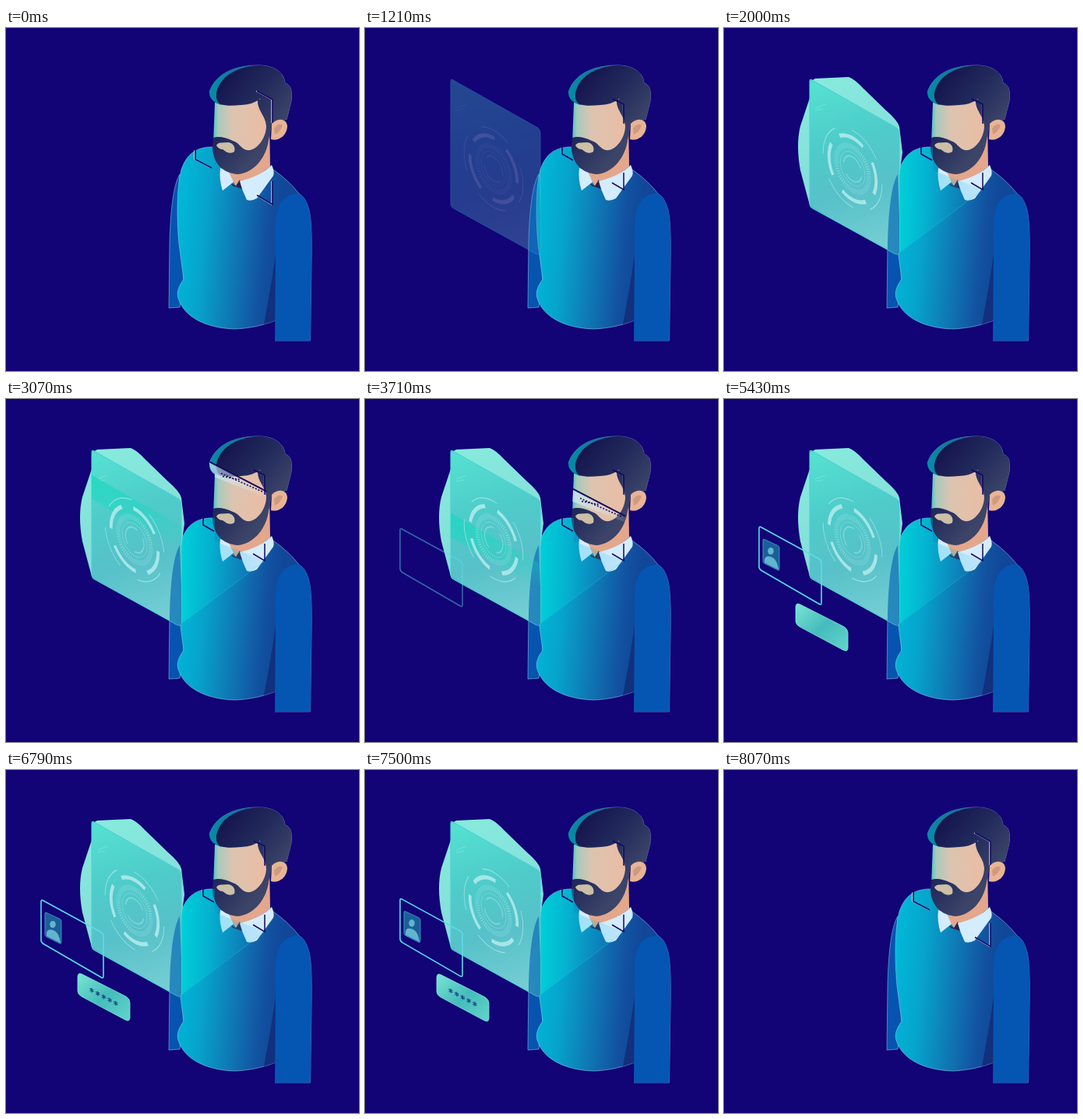
An HTML page that plays this animation: 453x441 px, repeating every 8140 ms.

```html
<!DOCTYPE html>
<html lang="en">
<head>
<meta charset="utf-8">
<title>Face scan</title>
<style>
html, body { margin: 0; width: 100%; height: 100%; overflow: hidden; background: #120476; }
svg { display: block; width: 453px; height: 441px; }
</style>
</head>
<body>
<svg viewBox="0 0 453 441" fill="none">
  <defs>
    <linearGradient id="sweater" gradientUnits="userSpaceOnUse" x1="220" y1="270" x2="352" y2="282">
      <stop stop-color="#00b6d6"/><stop offset=".25" stop-color="#06a4cc"/>
      <stop offset=".6" stop-color="#0f74b2"/><stop offset=".85" stop-color="#1251a0"/><stop offset="1" stop-color="#114698"/>
    </linearGradient>
    <linearGradient id="skin" gradientUnits="userSpaceOnUse" x1="267" y1="0" x2="335" y2="0">
      <stop stop-color="#5cc6c4"/><stop offset=".08" stop-color="#a9cabc"/>
      <stop offset=".35" stop-color="#dcc4b0"/><stop offset="1" stop-color="#ebbca4"/>
    </linearGradient>
    <linearGradient id="hair" gradientUnits="userSpaceOnUse" x1="285" y1="62" x2="355" y2="120">
      <stop stop-color="#16164f"/><stop offset=".5" stop-color="#222b5c"/><stop offset="1" stop-color="#3c4468"/>
    </linearGradient>
    <linearGradient id="fringe" x1="0" x2="1">
      <stop stop-color="#078ba5"/><stop offset="1" stop-color="#0d6d95"/>
    </linearGradient>
    <linearGradient id="panel" gradientUnits="userSpaceOnUse" x1="130" y1="70" x2="190" y2="285">
      <stop stop-color="#4fdfcf"/><stop offset=".35" stop-color="#48c9c8"/>
      <stop offset=".65" stop-color="#52bec7"/><stop offset="1" stop-color="#74cdd3"/>
    </linearGradient>
    <linearGradient id="glow" x1="0" y1="0" x2=".3" y2="1">
      <stop stop-color="#86ecdc"/><stop offset="1" stop-color="#84d6da"/>
    </linearGradient>
    <linearGradient id="beam" gradientUnits="userSpaceOnUse" x1="225" y1="0" x2="335" y2="0">
      <stop stop-color="#00e0d8" stop-opacity=".6"/><stop offset=".45" stop-color="#00c4d8" stop-opacity=".25"/>
      <stop offset="1" stop-color="#00a0d8" stop-opacity=".08"/>
    </linearGradient>
    <linearGradient id="button" x1="0" y1="0" x2="1" y2="1">
      <stop stop-color="#7be5d3"/><stop offset=".5" stop-color="#45bcbc"/><stop offset="1" stop-color="#62d5ca"/>
    </linearGradient>
    <linearGradient id="band" x1="0" y1="0" x2="0" y2="1">
      <stop stop-color="#18d8c0" stop-opacity=".75"/><stop offset="1" stop-color="#18d8c0" stop-opacity="0"/>
    </linearGradient>
    <linearGradient id="mist" x1="0" x2="1">
      <stop stop-color="#d8f0ff" stop-opacity=".75"/><stop offset="1" stop-color="#d8f0ff" stop-opacity=".1"/>
    </linearGradient>
    <path id="torso" d="M268 153C244 152 232 162 225 182C219 204 219 245 222 277L228 323C221 333 218 341 222 350C229 370 254 386 294 387C316 386 333 381 346 376L348 245L376 213Q364 197 343 182Z"/>
    <path id="farArm" d="M223 188C214 203 211 240 210 275L209 360L223 359L228 323Z"/>
    <path id="headShape" d="M261 83C267 62 289 48 324 48C344 48 357 57 358 71C367 73 367 84 366 94L360 121L336 155Q322 187 297 188Q268 180 265 155L268 97Q261 93 261 83Z"/>
    <path id="panelShape" d="M113 67L221 128Q225 131 225 136V287Q225 293 219 290L114 232Q110 230 110 225V69Q110 65 113 67Z"/>
    <clipPath id="torsoClip"><use href="#torso"/></clipPath>
    <clipPath id="headClip"><use href="#headShape"/></clipPath>
    <clipPath id="panelClip"><use href="#panelShape"/></clipPath>
  </defs>

  <!-- man -->
  <g stroke="#9fd0f0" stroke-opacity=".65" stroke-width=".8">
    <use href="#farArm" fill="#0654b0"/>
    <use href="#torso" fill="url(#sweater)"/>
    <path d="M345 402H390.500L392 300Q393 244 388 231Q384 217 376 213"/>
    <path d="M261 83C267 62 289 48 324 48C344 48 357 57 358 71C367 73 367 84 366 94L360 118"/>
  </g>
  <path fill="#12307b" d="M347 285Q339 340 331 381L346 376Z"/>
  <path fill="#0556b3" d="M345 402H390.500L392 300Q393 244 388 231Q384 217 376 213C360 212 350 223 347 240Q345 255 346 290Z"/>
  <path fill="#e3a78c" d="M338 120L339 178Q318 196 296 205L284 184Z"/>
  <path fill="#29224f" d="M288 199L295 203L300 195L303 207L291 203Z"/>
  <path id="collar" fill="#d4ecff" d="M275 180L285 183L292 198L278 209Q273 194 275 180ZM300 197Q328 190 341 176Q345 185 343 190L322 219Q315 223 309 221Q303 209 300 197Z"/>
  <path fill="url(#hair)" d="M270 90C273 67 294 49 324 48C344 48 357 57 358 71C367 73 367 84 366 94L360 118L337 128L325 90Z"/>
  <path fill="url(#skin)" d="M268 96L326 91L337 122V142Q327 174 298 179L266 150Z"/>
  <path fill="#e8b496" d="M341 123C350 114 361 117 361 127C360 139 349 146 340 143Z"/>
  <path fill="#d09a80" d="M344 129Q350 121 355 125Q352 134 345 137Z"/>
  <path fill="url(#hair)" d="M323 92C322 106 333 112 334 126C334 142 321 159 309 157C301 155 300 148 291 145Q276 138 266 141L265 154C266 174 278 187 298 188C318 186 334 167 337 144L341 125L341 92Z"/>
  <path fill="#cdbfa6" d="M270 151C272 146 279 148 284 147C291 147 295 153 293 159C287 163 282 159 278 156Q273 156 270 151Z"/>
  <path fill="url(#fringe)" d="M261 83C267 62 289 48 324 48L304 56L276 99Q261 94 261 83Z"/>
  <path fill="url(#hair)" d="M270 84C274 64 293 50 324 48L350 70L326 91Q318 98 302 99Q284 101 275 98Q269 94 270 84Z"/>

  <!-- projection on the man -->
  <g id="cast" clip-path="url(#torsoClip)">
    <path fill="url(#beam)" d="M225 131L268 153V183L332 208L222 291Z"/>
    <path stroke="#22cfe0" stroke-opacity=".35" d="M332 208L222 291"/>
  </g>
  <g clip-path="url(#headClip)"><g id="faceScan">
    <path fill="url(#mist)" d="M253 55L334 97V105L253 73Z"/>
    <path stroke="#140a5c" stroke-width="2" d="M253 55L334 97"/>
    <path stroke="#140a5c" stroke-width="1.600" stroke-dasharray="2 2" d="M276 74L330 98M278 78L300 82"/>
  </g></g>
  <g id="marks">
    <path stroke="#d5e4f5" stroke-width=".9" d="M264 165L283 173L312 158M273 151L298 154M283 140V148"/>
    <path stroke="#160b68" stroke-width="3.500" stroke-dasharray="4 6" d="M276 135H290M273 149H301M280 158H295"/>
  </g>
  <path id="paleLine" stroke="#eaf5ff" stroke-width="1.200" transform="translate(-1 0)"/>
  <path id="darkLine" stroke="#120462" stroke-width="1.500"/>

  <!-- scanner panel -->
  <path id="halo" fill="url(#glow)" d="M110 69L117 65L160 63Q168 66 178 77L208 106Q223 119 225 127L229 160L225 190L219 290L140 246L110 228L98 183Q92 150 98 126L110 90Z"/>
  <g id="screen">
    <use href="#panelShape" fill="url(#panel)" fill-opacity=".9" stroke="#4fd0d8" stroke-width="1.100"/>
    <path stroke="#8feee6" stroke-opacity=".5" d="M117 103L130 98M117 106L127 104"/>
    <g clip-path="url(#panelClip)">
      <use href="#farArm" fill="#1a7dba" fill-opacity=".85"/>
      <path id="panelScan" fill="url(#band)" d="M110 65L225 131V162L110 96Z"/>
    </g>
    <g transform="translate(165 181) matrix(.84 .47 0 1.1 0 0)" stroke="#c0f0f0">
      <g id="dial"></g>
      <g stroke-opacity=".4">
        <circle r="25" stroke-width="6" stroke-dasharray="1 1.618"/>
        <circle r="19" stroke-width=".7"/>
        <g id="core"><path stroke-width="1.500" d="M-14 0A14 14 0 0 1 12 -7M14 2A14 14 0 0 1 -9 10.700"/></g>
      </g>
    </g>
  </g>

  <!-- identity card and password field -->
  <g id="card">
    <path stroke="#5adce8" stroke-width="1.600" stroke-linejoin="round" d="M47 167L122 208Q125 210 125 213V264Q125 268 122 266L48 223Q45 221 45 218V169Q45 166 47 167Z"/>
    <g id="avatar">
      <path fill="#1c5e98" stroke="#4aa5c8" stroke-width=".8" d="M52 183L69 191Q71 192 71 194V221Q71 224 68 222L52 214Q50 213 50 211V184Q50 182 52 183Z"/>
      <ellipse cx="60" cy="198" rx="3.800" ry="4.600" fill="#62b5cf"/>
      <path fill="#62b5cf" d="M52 213Q51 203 59 205Q68 207 70 222Z"/>
    </g>
  </g>
  <g id="field">
    <path fill="url(#button)" stroke="#82e6d8" stroke-width=".8" d="M97 263L154 292Q159 295 159 300V319Q159 325 153 322L97 292Q92 289 92 285V267Q92 261 97 263Z"/>
    <g id="stars"></g>
  </g>
</svg>
<script>
const LOOP = 8140;
const $ = id => document.getElementById(id);
const ramp = (t, a, b) => {
  const k = Math.min(1, Math.max(0, (t - a) / (b - a)));
  return k * k * (3 - 2 * k);
};
const fade = (id, v) => $(id).setAttribute('opacity', v);
const move = (id, y) => $(id).setAttribute('transform', `translate(0 ${y})`);

function arc(r, mid, span) {
  const at = d => [Math.cos(d * Math.PI / 180) * r, Math.sin(d * Math.PI / 180) * r].map(n => n.toFixed(2));
  return `M${at(mid - span / 2)}A${r} ${r} 0 0 1 ${at(mid + span / 2)}`;
}
let dial = '';
for (let a = 0; a < 360; a += 90) {
  dial += `<path d="${arc(36, a, 60)}" stroke-width="4.500" stroke-opacity=".75"/>`;
  dial += `<path d="${arc(45, a + 30, 55)}" stroke-width="1" stroke-opacity=".65"/>`;
}
$('dial').innerHTML = dial;

let stars = '';
for (let i = 0; i < 5; i++) {
  stars += `<path transform="translate(${110 + i * 7.7} ${284 + i * 4.2})" stroke="#174f86" stroke-width="1.200" d="M0 -3V3M-2.500 -2.500L2.500 2M-2.500 1L2.500 -1"/>`;
}
$('stars').innerHTML = stars;

// Corner brackets: wide and tight positions of the same points
const wide = [[322, 81], [342, 92], [342, 122], [243, 157], [243, 169], [264, 180], [342, 197], [342, 227], [322, 215]];
const tight = [[317, 91], [332, 98], [332, 123], [253, 152], [253, 162], [267, 170], [332, 186], [332, 208], [317, 199]];
function brackets(k) {
  return wide.map((p, i) => (i % 3 ? 'L' : 'M') + p.map((v, j) => v + (tight[i][j] - v) * k)).join('');
}

function draw(t) {
  const out = 1 - ramp(t, 7750, 8040);
  const grip = ramp(t, 250, 950) * out;
  const path = brackets(grip);
  $('paleLine').setAttribute('d', path);
  $('darkLine').setAttribute('d', path);
  fade('paleLine', 1 - grip * .85);

  const show = (id, a, b) => fade(id, ramp(t, a, b) * out);
  show('screen', 930, 1650);
  show('halo', 1650, 1980);
  show('cast', 1300, 1950);
  show('card', 3500, 3950);
  show('avatar', 4550, 5000);
  show('field', 4800, 5300);

  // The dial swings out and back
  const turn = 48 * Math.sin((t - 2000) / 4800 * Math.PI) - 4;
  $('dial').setAttribute('transform', `rotate(${turn})`);
  $('core').setAttribute('transform', `rotate(${-turn * 1.5})`);

  const scan = (t - 2640) / 2140;
  const on = ramp(scan, 0, .08) * (1 - ramp(scan, .92, 1));
  move('faceScan', scan * 107);
  move('panelScan', scan * 163);
  fade('faceScan', on * (1 - ramp(scan, .55, .8)));
  fade('panelScan', on * (1 - ramp(scan, .6, .84)));
  fade('marks', ramp(t, 4000, 4250) * (1 - ramp(t, 4600, 4850)));

  const wave = Math.cos((t - 5430) / 2720 * 2 * Math.PI);
  move('card', -1 - 1.5 * wave);
  move('field', wave * .8);
  [...$('stars').children].forEach((s, i) => s.setAttribute('opacity', ramp(t, 5500 + i * 200, 5650 + i * 200)));
}

const start = performance.now();
function frame() {
  draw((performance.now() - start) % LOOP);
  requestAnimationFrame(frame);
}
frame();
</script>
</body>
</html>
```
